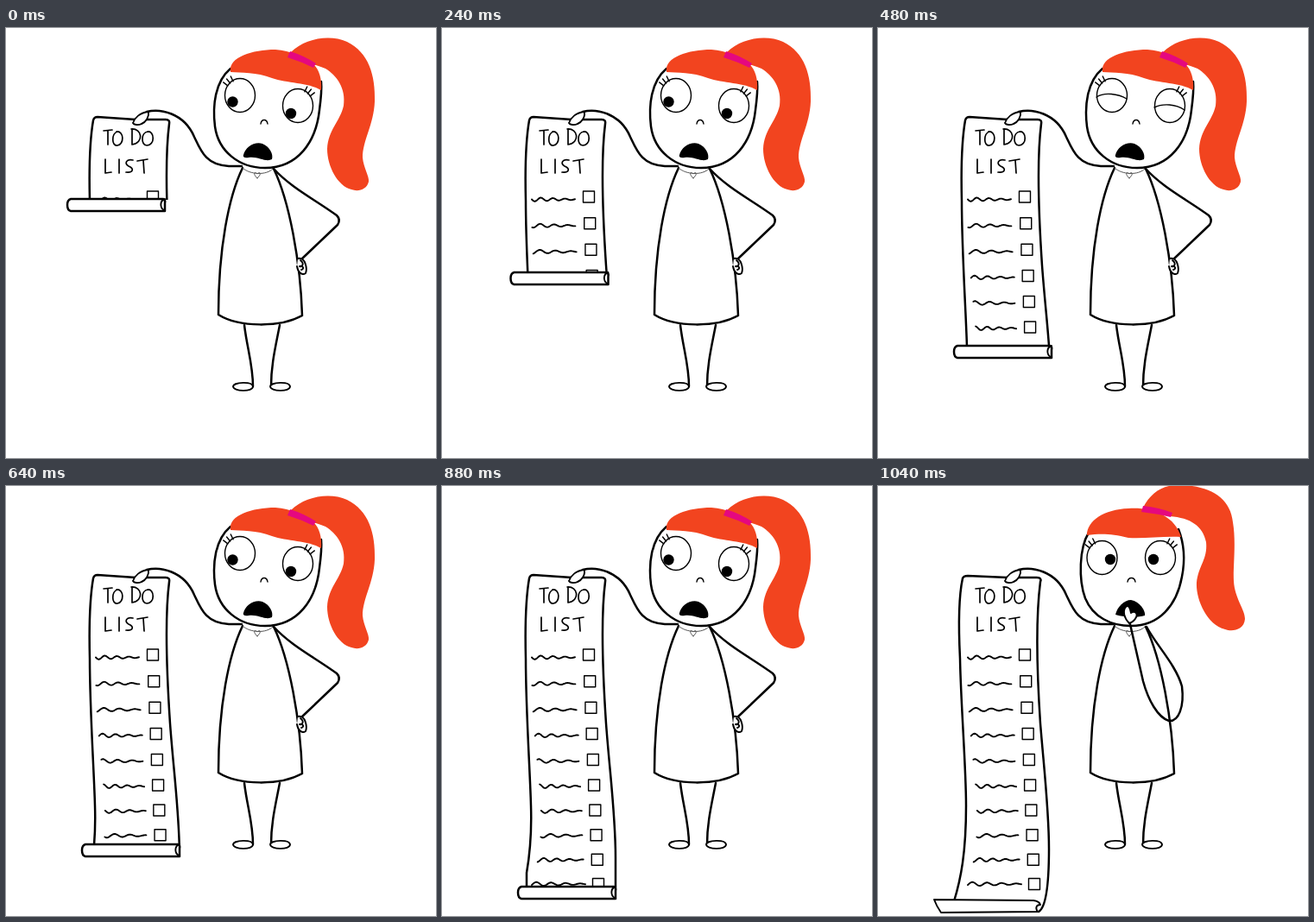
Recreate the animation shown at these times as an HTML page. Size 498 by 498 pixels, loop 2000 ms.

```html
<!DOCTYPE html>
<html lang="en">
<head>
<meta charset="utf-8">
<title>To do list</title>
<style>
  html, body { margin: 0; width: 100%; height: 100%; overflow: hidden; background: #fff; }
  svg { display: block; width: 100vw; height: 100vh; }
  .ink { fill: #fff; stroke: #000; stroke-width: 2.5; stroke-linecap: round; stroke-linejoin: round; }
  .line { fill: none; }
  .mid { stroke-width: 1.9; }
  .thin { stroke-width: 1.4; }
  .text { fill: none; stroke-width: 1.7; }
  .hair { fill: #f2441f; stroke: none; }
  .band { fill: #e5087f; stroke: none; }
  .solid { fill: #000; stroke: none; }
  .soft { fill: none; stroke: #555; stroke-width: 1; }
</style>
</head>
<body>
<svg viewBox="0 0 498 498" class="ink">
  <defs>
    <clipPath id="reach"><rect id="reachBox" width="240" height="200"/></clipPath>
    <path id="foot" class="mid" d="M23 0C22 -6 1 -5 0 0C0 6 23 7 23 0Z"/>
  </defs>

  <!-- legs and dress -->
  <path class="line" d="M276 344C279 370 286 390 286 415M317 344C312 370 307 390 307 415"/>
  <use href="#foot" x="263" y="415"/>
  <use href="#foot" x="306" y="415"/>
  <path d="M274 162C258 195 246 255 246 332C270 347 318 347 343 333C341 270 328 200 310 163"/>
  <path class="soft" d="M274 162C282 170 302 171 309 163M291 174C285 168 288 166 291 169C294 166 297 168 291 174"/>

  <!-- paper -->
  <g clip-path="url(#reach)">
    <path id="hanging" d="M98 480L98 448C102 425 104 400 103 370C102 330 97 260 97 200C96 160 97 130 101 107Q102 103 106 103L150 106L185 106Q190 106 189 111C184 150 186 215 190 275C194 330 201 380 201 430L201 480"/>
    <path id="settled" d="M88 481C96 455 102 425 102 370C102 325 96 255 95 200C93 160 93 130 98 107Q99 104 104 104L150 106L184 106Q190 106 188 111C183 150 184 215 188 275C192 325 198 375 198 420C198 458 195 488 186 493"/>
    <g class="text" role="img" aria-label="TO DO LIST">
      <path d="M113 119L123 118M118 119L118 135M129 120C122 122 122 137 129 136C137 135 137 119 128 120M146 118L146 135C160 133 158 116 145 117M165 120C156 120 156 136 163 136C173 136 172 119 164 120"/>
      <path d="M115 152L115 168L122 167M131 152L131 168M147 153C139 151 137 157 142 160C149 163 147 168 139 167M152 154L164 152M159 153L160 168"/>
    </g>
    <g id="rows"></g>
  </g>

  <g id="roll">
    <path d="M4 -7L111 -7Q114 -6 113 -2L113 7L4 7Q0 6 0 0Q0 -6 4 -7Z"/>
    <path class="line mid" d="M113 -7C107 -5 107 3 112 6"/>
  </g>
  <path id="curl" class="mid" d="M65 479L180 480Q187 481 188 485C183 485 182 489 185 493L73 494Q68 487 65 479Z"/>

  <!-- arm holding the paper -->
  <path class="line" d="M163 97C178 93 206 98 218 126C226 143 232 159 258 160L273 160"/>
  <path class="mid" d="M147 110C149 104 155 98 165 97C166 103 162 109 157 111C153 113 148 112 147 110Z"/>

  <g id="shocked">
    <path class="line" d="M310 163C330 185 360 200 383 217Q388 222 384 228L343 267"/>
    <path class="mid" d="M338 267C347 265 349 279 347 284C343 287 338 283 337 276M341 269C346 273 343 277 340 276C344 275 346 279 342 280"/>
    <path d="M260 47C242 62 239 90 242 114C246 143 270 162 300 162C338 162 359 132 363 95C365 80 366 72 365 62"/>
    <path class="hair" d="M330 28C346 12 375 7 395 16C420 28 428 55 427 85C426 112 413 130 413 150C414 162 421 172 420 178C418 187 408 190 400 187C384 183 372 160 372 140C373 118 387 108 391 90C394 70 383 55 370 47C362 43 350 42 340 36Z"/>
    <path class="hair" d="M260 50C258 34 285 25 312 25C330 26 345 34 356 42C363 48 366 60 365 72C350 63 325 64 308 58C290 51 272 52 260 51Z"/>
    <path class="band" d="M329 27Q345 32 359 41L356 46Q342 39 326 34Z"/>
    <g id="wideEyes"></g>
    <path id="lids" class="line thin" d="M253 80C262 74 278 76 288 82M320 92C330 87 345 88 355 95"/>
    <path class="line thin" d="M295 111C296 105 302 105 303 111"/>
    <path class="solid" d="M275 147C277 138 288 131 297 134C305 137 310 146 308 152C301 156 291 148 281 150C276 151 274 149 275 147Z"/>
  </g>

  <g id="biting">
    <path d="M244 54C233 72 232 108 240 130C249 152 270 162 293 162C326 162 346 138 352 105C356 85 355 68 348 50"/>
    <path class="hair" d="M307 25C315 9 328 0 344 -1C382 -2 408 12 411 42C415 65 411 95 412 110C413 130 425 143 425 154C424 167 410 169 402 166C380 160 368 130 369 112C371 92 382 85 380 65C376 46 362 37 338 35Z"/>
    <path class="hair" d="M242 57C242 40 262 27 290 26C316 24 344 34 351 59C330 58 310 61 290 60C270 55 258 55 242 57Z"/>
    <path class="band" d="M307 23Q326 25 341 31L339 36Q322 32 305 30Z"/>
    <g id="crossEyes"></g>
    <path class="line thin" d="M289 111C290 105 297 105 298 111"/>
    <path class="solid" d="M275 149C277 140 285 132 293 132C303 134 310 144 309 150C300 153 285 152 275 149Z"/>
    <path class="mid" d="M291 159C285 153 283 145 287 140C290 137 292 141 293 147C297 144 301 147 299 152C297 156 294 158 291 159Z"/>
    <path class="line" d="M311 163C322 184 345 207 352 232C355 256 348 273 337 272C324 268 313 248 307 226C301 200 296 178 292 160"/>
  </g>
</svg>

<script>
const LOOP = 2000, STEP = 80;
const SETTLE = 960, BITE = 1040;
const BLINK = 480;
const ROW_COUNT = 10;

const $ = id => document.getElementById(id);
const show = (id, on) => { $(id).style.display = on ? "" : "none"; };
const mix = (a, b, k) => a + (b - a) * k;

// A wave that flattens out towards its end, a little different in each row
function squiggle(x0, x1, y, seed) {
  const wave = 14 + seed * 2 % 5;
  let d = "";
  for (let x = x0; x <= x1; x++) {
    const k = (x - x0) / (x1 - x0);
    const dy = mix(2.4, 0.5, k) * Math.sin((x - x0) / wave * 2 * Math.PI + seed);
    d += `${d ? "L" : "M"}${x.toFixed(1)} ${(y + dy).toFixed(1)}`;
  }
  return `<path class="line mid" d="${d}"/>`;
}

// Rows follow the bend of the paper
function row(i) {
  const k = i / (ROW_COUNT - 1);
  const cx = mix(170, 181, k);
  const cy = mix(195.5, 461, k) + 3.5 * Math.sin(Math.PI * k);
  const left = 104 + 11 * Math.sin(Math.PI * k * k);
  return squiggle(left, mix(154, 166, k), cy + mix(3, 0, k), i) +
    `<rect class="thin" x="${cx - 6.5}" y="${cy - 6.5}" width="13" height="13"/>`;
}

// Side is -1 for lashes on the left, 1 for the right
function eye(cx, cy, px, py, side) {
  let lashes = "";
  for (let j = 0; j < 3; j++) {
    const a = (38 + 13 * j) * Math.PI / 180;
    const at = r => `${cx + side * r * Math.cos(a)} ${cy - r * Math.sin(a)}`;
    lashes += `M${at(18)}L${at(24.5)}`;
  }
  return `<g class="thin"><ellipse cx="${cx}" cy="${cy}" rx="17.5" ry="19.5"/>` +
    `<path class="line" d="${lashes}"/>` +
    `<circle class="solid pupil" cx="${px}" cy="${py}" r="6.2"/></g>`;
}

// The roll drops evenly, then slows as the paper runs out
function rollHeight(n) {
  return n < 6 ? mix(205, 375, n / 6) : mix(375, 478, 1 - (1 - (n - 6) / 6) ** 1.5);
}

$("rows").innerHTML = Array.from({ length: ROW_COUNT }, (_, i) => row(i)).join("");
$("wideEyes").innerHTML = eye(271, 78, 262.5, 85.5, -1) + eye(338, 90, 330, 99, 1);
$("crossEyes").innerHTML = eye(259.5, 83, 269, 85, -1) + eye(327, 83, 319, 85, 1);
const pupils = $("wideEyes").querySelectorAll(".pupil");

function draw(t) {
  const n = Math.floor(t / STEP);
  const settled = t >= SETTLE, bite = t >= BITE;
  const blink = t >= BLINK && t < BLINK + STEP;
  const x = mix(71, 88, Math.min(1, n / 6)), y = rollHeight(Math.min(n, 12));

  $("reachBox").setAttribute("height", settled ? 498 : y - 6);
  $("roll").setAttribute("transform", `translate(${x} ${y})`);
  show("hanging", !settled);
  show("roll", !settled);
  show("settled", settled);
  show("curl", settled);
  show("shocked", !bite);
  show("biting", bite);
  show("lids", blink);
  pupils.forEach(p => { p.style.display = blink ? "none" : ""; });
}

const start = performance.now();
function tick() {
  draw((performance.now() - start) % LOOP);
  requestAnimationFrame(tick);
}
tick();
</script>
</body>
</html>
```
